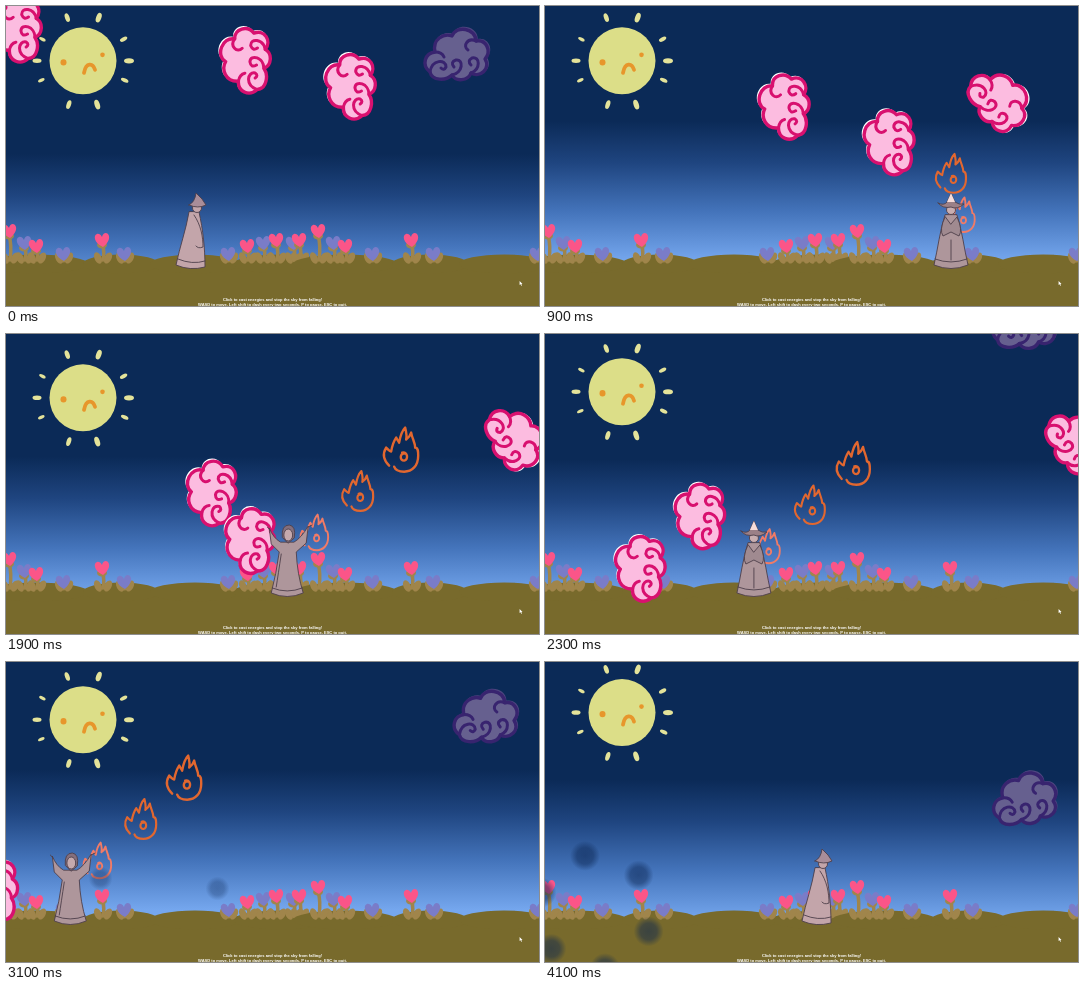
Recreate the animation shown at these times as an HTML page. Size 533 by 300 pixels, loop 4200 ms.

```html
<!DOCTYPE html>
<html lang="en">
<head>
<meta charset="utf-8">
<title>Falling sky</title>
<style>
  html, body { margin: 0; width: 100%; height: 100%; overflow: hidden; background: #0b2a57; }
  svg { display: block; width: 100vw; height: 100vh; }
  path { stroke-linecap: round; stroke-linejoin: round; }
  .pink { fill: #fcbce0; stroke: #d8106f; --halo: #fff; }
  .purple { fill: #66608f; stroke: #38246f; --halo: #4d457f; }
  .fire { fill: none; stroke: #e2672f; }
  .fresh { fill: none; stroke: #f17b66; }
  .robe { fill: #ae969b; stroke: #4f404b; stroke-width: .9; }
  text { font: bold 4.05px "Liberation Sans", Arial, sans-serif; fill: #fff; text-anchor: middle; }
</style>
</head>
<body>
<svg viewBox="0 0 533 300" preserveAspectRatio="none">
  <defs>
    <linearGradient id="sky" gradientUnits="userSpaceOnUse" x2="0" y2="140">
      <stop stop-color="#0b2a57"/>
      <stop offset=".3" stop-color="#1f4580"/>
      <stop offset=".65" stop-color="#4474bb"/>
      <stop offset="1" stop-color="#75a7ee"/>
    </linearGradient>
    <radialGradient id="spark">
      <stop stop-color="#fff3bd"/>
      <stop offset=".45" stop-color="#d8c184" stop-opacity=".8"/>
      <stop offset="1" stop-color="#a99867" stop-opacity="0"/>
    </radialGradient>
    <radialGradient id="smoke">
      <stop stop-color="#0a2450"/>
      <stop offset=".55" stop-color="#0a2450" stop-opacity=".85"/>
      <stop offset="1" stop-color="#0a2450" stop-opacity="0"/>
    </radialGradient>

    <path id="puff" d="M-26 17C-35 10-31-2-21-3C-24-16-12-22-4-19C0-30 20-27 20-14C30-16 36-4 29 4C35 14 24 23 15 18C12 26 0 27-4 20C-10 26-24 26-26 17Z"/>
    <g id="cloud">
      <use href="#puff" transform="translate(1 -1.5) scale(1.04)" style="fill:var(--halo);stroke:none"/>
      <use href="#puff" stroke-width="3.4"/>
      <path fill="none" stroke-width="3" d="M-21-3q7 0 9 5M-26 17C-24 4-10 4-10 12q-2 4-5 1M-4 20C7 18 8 4 0 5q-6 2-2 7M15 18C25 14 24 1 16 3q-5 3-1 7M20-14C12-18 6-9 12-5"/>
    </g>

    <path id="flame" stroke-width="2.4" d="M-12 15C-19 8-18 2-15-3c2 2 4 4 5 4C-9-5-7-10-5-13c1 2 2 3 3 5C-1-14 1-20 4-23c1 4 2 8 1 12 3-2 4-4 5-7 1 6 4 10 4 15 3 0 3 4 3 8 0 10-6 16-14 16-5 0-9-2-10-5M1 2c5-2 7 7 2 8-5 0-4-8 0-7"/>

    <g id="side" class="robe" style="fill:#c3a5aa">
      <path d="M-4-56C-7-38-13-22-17-3q14 6 29 2C12-20 10-38 6-56z"/>
      <path d="M1-53c7 10 9 22 9 32q-5 2-7-1M-15-9q14 6 27 2" fill="none"/>
      <circle cx="4" cy="-60" r="4.5"/>
      <path d="M-4-63Q2-66 3-75L9-69 13-63q-8 4-17 0z" fill="#a98d99"/>
    </g>
    <g id="front" class="robe">
      <path d="M-6-53C-11-38-13-20-17-3q17 7 34 0C13-20 11-38 6-53z"/>
      <path d="M-16-9q16 6 32 0M0-28v20" fill="none"/>
      <path d="M-6-51Q-12-38-8-32L0-36 8-32Q12-38 6-51L0-44z" fill="#a08a90"/>
      <circle cy="-58" r="4.5" fill="#c9aeb0"/>
      <path d="M-13-65Q-7-62-4-66L0-75 4-66Q8-63 13-64 6-58 0-61-8-59-13-65z" fill="#9b8087"/>
      <path d="M-4-66L0-75 4-66z" fill="#f6dcd9" stroke="none"/>
    </g>
    <g id="arms" class="robe">
      <path d="M-7-54Q-14-58-18-68L-16-52-8-44Q-11-22-16-3q16 7 32 0Q10-22 9-44L19-53 21-70Q14-58 7-54z"/>
      <path d="M-18-67l-2-2M21-69l4-2M-15-8q15 6 30 0M-6-42q-3 20-5 33" fill="none"/>
      <path d="M-5-59Q-6-71 2-71 9-70 7-58L1-53z" fill="#846f7d"/>
      <ellipse cx="1" cy="-61" rx="4.4" ry="6" fill="#c5a9ad"/>
    </g>
    <g id="meadow"></g>
  </defs>

  <rect width="533" height="300" fill="url(#sky)"/>
  <g id="sun">
    <circle r="33.5" fill="#dcde88"/>
    <g id="rays" fill="#e4e39a"></g>
    <g fill="#e7962b">
      <ellipse cx="-19.5" cy="1.5" rx="3" ry="3.2"/>
      <circle cx="19.5" cy="-6" r="2.3"/>
    </g>
    <path d="M1 12C3 1 10 2 12 9" fill="none" stroke="#e7962b" stroke-width="3.8"/>
  </g>
  <use href="#meadow"/><use href="#meadow" x="309"/>
  <g id="actors"></g>
  <text x="266.5" y="295">Click to cast energies and stop the sky from falling!</text>
  <text x="266.5" y="299.5">WASD to move. Left shift to dash every two seconds. P to pause. ESC to quit.</text>
  <path d="M513.6 275v4l1-.8.8 1.6.7-.4-.8-1.5h1.2z" fill="#fff"/>
</svg>

<script>
const $ = id => document.getElementById(id);
const LOOP = 4.2, PINK = '#fb5588', PURPLE = '#7a7cc8';

function add(markup) {
  $('actors').insertAdjacentHTML('beforeend', markup);
  return $('actors').lastElementChild;
}

function place(el, visible, x, y, turn = 0, size = 1) {
  el.style.display = visible ? '' : 'none';
  el.setAttribute('transform', `translate(${x} ${y}) rotate(${turn}) scale(${size})`);
}

// Piecewise linear value through [seconds, value] points
function along(points, t) {
  const i = points.findIndex(p => p[0] > t);
  if (i < 1) return points.at(i)[1];
  const [t0, a] = points[i - 1], [t1, b] = points[i];
  return a + (b - a) * (t - t0) / (t1 - t0);
}

// Scenery: mirrored sun rays, then one strip of meadow that repeats
$('rays').innerHTML = [-70, -28, 0, 25, 72].flatMap(a => [a, 180 - a]).map((a, i) =>
  `<ellipse cx="46" rx="${5 - i % 4 / 2}" ry="${2.6 - i % 4 / 3}" transform="rotate(${a})"/>`).join('');

const hill = ([x, width]) => `<ellipse cx="${x}" cy="258" rx="${width}" ry="9.5" fill="#786a2c"/>`;

const flower = (x, y, color) => `
  <g fill="#a0854b" transform="translate(${x} ${y})">
    <path d="M0 4Q3 ${(254 - y) / 2} 1 ${254 - y}" fill="none" stroke="#a0854b" stroke-width="3.5"/>
    <ellipse cy="5" rx="5" ry="3.5"/>
    <ellipse rx="3.5" ry="6" transform="translate(-4 ${252 - y}) rotate(-25)"/>
    <ellipse rx="3.5" ry="6" transform="translate(6 ${252 - y}) rotate(28)"/>
    <path fill="${color}" d="M1 7C-8 3-9-5-5-6-2-7 0-3 0-3 1-8 6-8 7-4 8 0 4 5 1 7z"/>
  </g>`;

const beds = [
  [PURPLE, 237, [18, 257, 287]], [PURPLE, 248, [57, 118, 222]],
  [PINK, 225, [3]], [PINK, 234, [96, 270, 293]], [PINK, 240, [30, 241]],
];
$('meadow').innerHTML = '<path fill="#786a2c" d="M-1 255H311V300H-1z"/>' +
  [[30, 52], [115, 38], [189, 45], [275, 48]].map(hill).join('') +
  beds.flatMap(([color, y, xs]) => xs.map(x => flower(x, y, color))).join('');

// Clouds fall steadily from x, y; pull is a sideways acceleration that begins at 1.2 s
const clouds = [
  { cls: 'pink', x: 10, y: 24, fall: 50, to: .4 },
  { cls: 'pink', x: 239, y: 55, fall: 58, pull: -70, to: 3.2 },
  { cls: 'pink', x: 344, y: 81, fall: 70, pull: -206, to: 2.4 },
  { cls: 'purple', x: 450, y: 49, fall: 75, to: .9 },
  { cls: 'pink', x: 454, y: 93, fall: 10, drift: 55, turn: 60, from: .9, to: 3.2 },
  { cls: 'purple', x: 479, y: -35, fall: 82, from: 2 },
].map(c => ({
  pull: 0, drift: 0, from: 0, to: LOOP, turn: c.cls === 'pink' ? -80 : 0, ...c,
  el: add(`<use href="#cloud" class="${c.cls}"/>`),
}));

// Volleys of flames rise from where the wizard stood, one every 0.24 s
const flames = [
  { start: .57, count: 2, lean: 115 },
  { start: 1.27, count: 9, lean: 0 },
].flatMap(({ start, count, lean }) => Array.from({ length: count }, (_, i) => ({
  born: start + i * .24, lean: lean * i, el: add('<use href="#flame"/>'),
})));

// Rings of soft dots that fly outwards and fade
const bursts = [
  { paint: 'spark', born: .4, x: 18, y: 22, size: 13, count: 2 },
  { paint: 'smoke', born: 2.5, x: 148, y: 280, size: 12, count: 4 },
  { paint: 'smoke', born: 3.7, x: 50, y: 250, size: 15, count: 6 },
].map(b => ({
  ...b, dots: Array.from({ length: b.count }, () => add(`<circle r="${b.size}" fill="url(#${b.paint})"/>`)),
}));

const wizard = add('<use/>');
const walk = [[.1, 187], [.54, 406], [1.21, 406], [3.19, 48], [3.6, 48], [4.1, 274]];
const dusk = [[0, 148], [.5, 112], [2.6, 128], [3.6, 88], [4.1, 118]];

function pose(t) {
  if (t < .7 || t >= 3.7) return 'side';
  return Math.floor(t / .75) % 2 ? 'front' : 'arms';
}

function draw(t) {
  place($('sun'), true, 77, 57 + 7 * Math.cos((t - .45) / 1.5 * 2 * Math.PI));
  $('sky').setAttribute('gradientTransform', `translate(0 ${along(dusk, t)})`);

  for (const c of clouds) {
    const age = Math.max(0, t - Math.max(c.from, .1));
    const x = c.x + c.drift * age + c.pull * Math.max(0, t - 1.2) ** 2;
    place(c.el, t >= c.from && t < c.to, x, c.y + c.fall * age, c.turn + 7 * Math.sin(4 * t));
  }
  for (const f of flames) {
    const age = t - f.born;
    f.el.setAttribute('class', age < .3 ? 'fresh' : 'fire');
    place(f.el, age >= 0 && age < .7, along(walk, f.born) + f.lean * age, 225 - 172 * age, 0, .75 + .4 * age);
  }
  for (const b of bursts) {
    const age = t - b.born;
    b.dots.forEach((dot, i) => {
      const angle = i / b.count * 2 * Math.PI - .7, reach = 5 + 130 * age;
      place(dot, age >= 0 && age < .9, b.x + reach * Math.cos(angle), b.y + reach * Math.sin(angle));
      dot.style.opacity = 1 - age / .9;
    });
  }
  wizard.setAttribute('href', '#' + pose(t));
  place(wizard, true, along(walk, t), 262);
}

// The picture advances ten times a second, holding the first one twice as long
function tick(now) {
  const step = Math.floor(now / 100) % (LOOP * 10);
  draw(step < 2 ? 0 : step / 10);
  requestAnimationFrame(tick);
}
requestAnimationFrame(tick);
</script>
</body>
</html>
```
